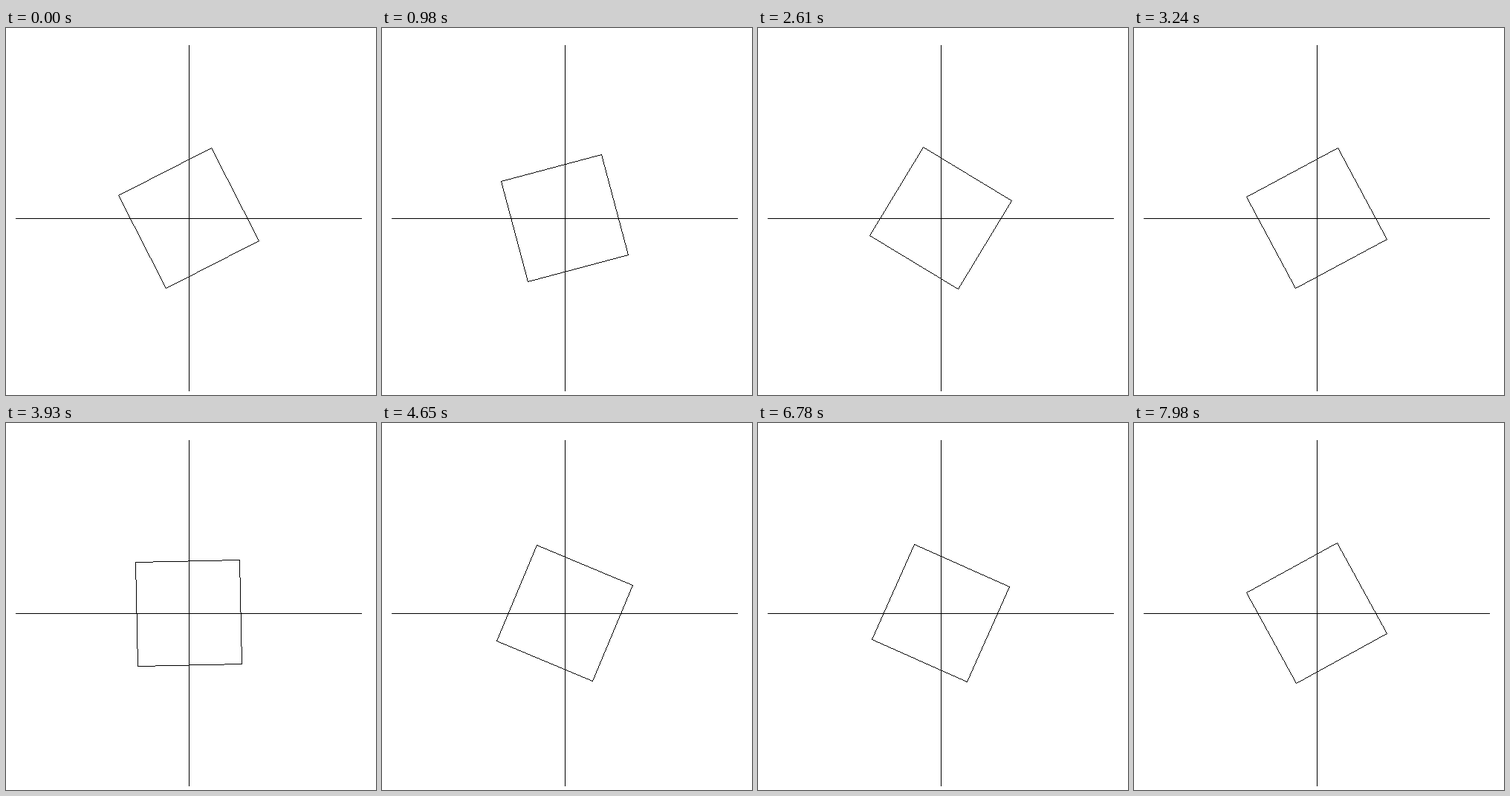
Recreate the animation shown at these times as an HTML page with a canvas. Size 498 px wide and 494 px high, loop 8000 ms.

```html
<!DOCTYPE html>
<html lang="en">
<head>
<meta charset="utf-8">
<title>Rotating square</title>
<style>
  html, body { margin: 0; width: 100%; height: 100%; overflow: hidden; background: #fff; }
  canvas { display: block; image-rendering: pixelated; }
</style>
</head>
<body>
<canvas id="stage" width="498" height="494"></canvas>
<script>
const ctx = document.getElementById('stage').getContext('2d');
const LOOP = 8000;
const STEP = 33;
const CENTER = { x: 246, y: 256 };
const RADIUS = 98.8;

// [time in ms, clockwise angle in degrees of the corner that starts on top]
const KEYS = [
  [0, 17.9], [1990, -143.65], [2520, -188], [3240, -253.2],
  [4650, -382.3], [5590, -510.4], [6560, -645], [6720, -645],
  [6780, -651], [7390, -704], [7980, -793.8]
];

// The angle advances in even steps between two keys.
function angleAt(time) {
  const next = KEYS.findIndex(([t]) => t > time);
  if (next < 0) return KEYS[KEYS.length - 1][1];
  const [t0, a0] = KEYS[next - 1];
  const [t1, a1] = KEYS[next];
  const steps = Math.round((t1 - t0) / STEP);
  const done = Math.floor((time - t0) / (t1 - t0) * steps);
  return a0 + (a1 - a0) * done / steps;
}

// One pixel wide line without antialiasing.
function line(x0, y0, x1, y1) {
  const dx = Math.abs(x1 - x0), dy = Math.abs(y1 - y0);
  const sx = Math.sign(x1 - x0), sy = Math.sign(y1 - y0);
  let error = dx - dy;
  for (;;) {
    ctx.fillRect(x0, y0, 1, 1);
    if (x0 === x1 && y0 === y1) return;
    const twice = 2 * error;
    if (twice > -dy) { error -= dy; x0 += sx; }
    if (twice < dx) { error += dx; y0 += sy; }
  }
}

function corner(degrees) {
  const a = degrees * Math.PI / 180;
  return [
    Math.floor(CENTER.x + RADIUS * Math.sin(a)),
    Math.floor(CENTER.y - RADIUS * Math.cos(a))
  ];
}

function draw(time) {
  ctx.fillStyle = '#fff';
  ctx.fillRect(0, 0, 498, 494);
  ctx.fillStyle = '#000';
  line(13, 256, 478, 256);
  line(246, 23, 246, 488);
  const angle = angleAt(time);
  const corners = [0, 90, 180, 270].map(turn => corner(angle + turn));
  corners.forEach((from, i) => line(...from, ...corners[(i + 1) % 4]));
}

const start = performance.now();
function tick() {
  draw((performance.now() - start) % LOOP);
  requestAnimationFrame(tick);
}
tick();
</script>
</body>
</html>
```
